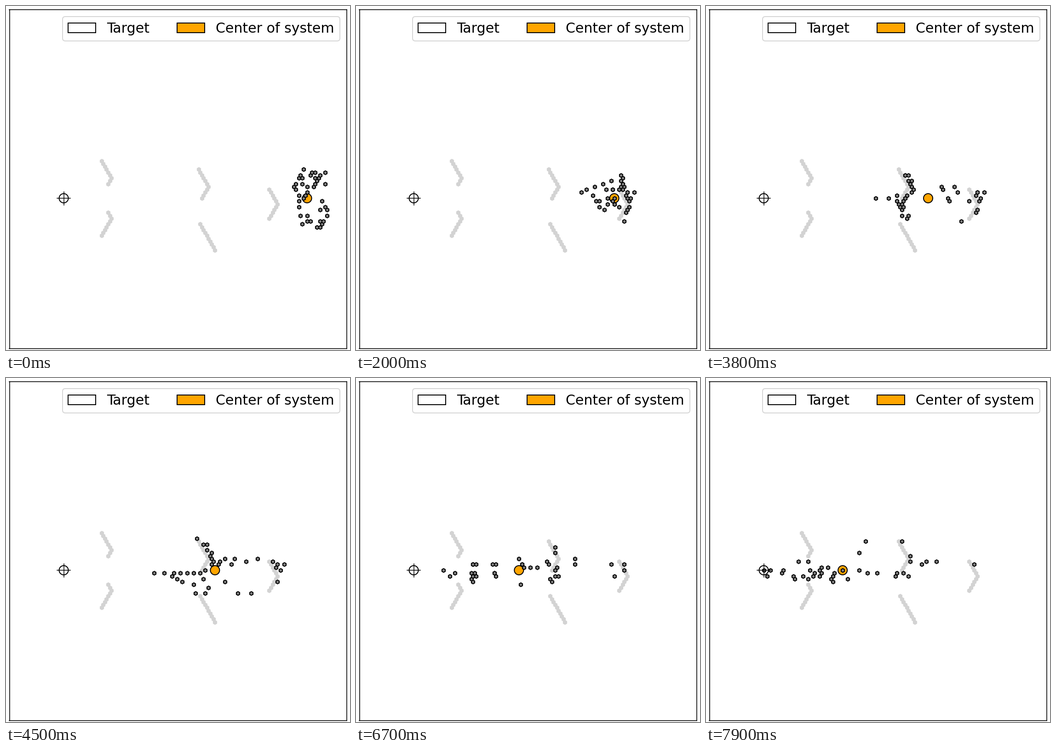
Recreate the animation shown at these times as a matplotlib script. Size 748 px wide and 748 px high, loop 8000 ms.

```python
import matplotlib.pyplot as plt
import numpy as np
from matplotlib.animation import FuncAnimation
from matplotlib.patches import Circle, Patch

SIZE, DPI = 748, 187
PX = 72 / DPI                      # points per pixel
FRAMES, STEP_MS = 80, 100
GOAL = np.array([125.5, 418.0])
HALF_COL, ROW = 3.575, 6.26        # hexagonal lattice pitch
HEX = 8.26 * PX
LINE = 2 * PX

# Key poses of the swarm: lattice row -> half-columns counted from the goal
START = {
    -10: [146], -9: [151, 153, 159], -8: [144, 150, 156],
    -7: [143, 145, 153, 155], -6: [154], -5: [141, 145, 153, 159],
    -4: [140, 148, 152], -3: [141], -2: [148], -1: [143, 147], 0: [146],
    1: [143, 157], 3: [143, 159], 4: [156, 160], 6: [144, 148, 160],
    8: [148, 150, 156, 158], 9: [145, 157], 10: [154, 156],
}
MIDDLE = {
    -11: [81], -9: [85, 87], -7: [87], -6: [90], -5: [89],
    -4: [90, 98, 104, 118], -3: [91, 95, 111, 127],
    -2: [90, 94, 102, 130, 134], -1: [129], 0: [86, 132],
    1: [55, 61, 67, 71, 75, 79, 83], 2: [66], 3: [69, 85],
    4: [72, 98, 130], 5: [79], 6: [88], 8: [80, 86, 106, 114],
}
END = {
    -10: [62, 84], -6: [58], -5: [89], -3: [21, 27, 89, 99, 105],
    -2: [96, 128], -1: [35, 39], 0: [0, 4, 12, 28, 34, 48, 58],
    1: [11, 31, 35, 43, 63, 69, 81, 85],
    2: [2, 18, 24, 30, 34, 42, 80, 88], 3: [19, 27, 41, 51], 4: [42],
}
KEYS = [(0, START), (45, MIDDLE), (79, END)]

# Places where the swarm queues: column, row of the tip, depth of the bend
STOPS = [(132, 2, 5), (90, -4, 6), (36, 0, 0), (2, 0, 0)]

# Obstacles as corners on the lattice
WALLS = [
    [(23, -13), (29, -7), (27, -5)],
    [(27, 5), (29, 7), (23, 13)],
    [(82, -10), (88, -4), (84, 0)],
    [(83, 9), (92, 18)],
    [(125, -3), (130, 2), (125, 7)],
]


def to_px(u, r):
    return GOAL[0] + HALF_COL * np.asarray(u), GOAL[1] + ROW * np.asarray(r)


def snap(u, r):
    """Nearest lattice site; column and row share their parity."""
    r = np.round(r)
    return r + 2 * np.round((u - r) / 2), r


def points(pose):
    return sorted((u, r) for r, cols in pose.items() for u in cols)


def leg(t0, a, t1, b):
    """Full speed from a to b, with the spare time spent in the queues."""
    (u0, r0), (u1, r1) = a, b
    span = max(u0 - u1, 1)
    halts = []
    for col, tip, depth in STOPS:
        if u1 - 4 <= col - 2 <= u0 + 4:
            r = r0 + (r1 - r0) * np.clip((u0 - col) / span, 0, 1)
            face = col - min(abs(r - tip), depth)
            halts.append((np.clip(face, u1, u0), r))
    spare = t1 - t0 - (u0 - u1) / 2
    way = [(t0, u0, r0)]
    for i, (u, r) in enumerate(halts):
        arrive = t0 + (u0 - u) / 2 + spare * i / len(halts)
        way += [(arrive, u, r), (arrive + spare / len(halts), u, r)]
    return way + [(t1, u1, r1)]


def swarm_paths():
    time = np.arange(FRAMES)
    us, rs = [], []
    for stations in zip(*(points(pose) for _, pose in KEYS)):
        way = []
        for i in range(len(KEYS) - 1):
            way += leg(KEYS[i][0], stations[i], KEYS[i + 1][0], stations[i + 1])
        t, u, r = np.array(way, float).T
        us.append(np.interp(time, t, u))
        rs.append(np.interp(time, t, r))
    return to_px(*snap(np.array(us), np.array(rs)))


def wall_sites(corners):
    sites = [corners[0]]
    for (u0, r0), (u1, r1) in zip(corners, corners[1:]):
        n = abs(r1 - r0)
        sites += [(u0 + (u1 - u0) * k / n, r0 + (r1 - r0) * k / n)
                  for k in range(1, n + 1)]
    return np.array(sites).T


fig = plt.figure(figsize=(SIZE / DPI, SIZE / DPI), dpi=DPI, facecolor="white")
left, right, top, bottom = 7.5, 740.5, 7.5, 744.5
ax = fig.add_axes([left / SIZE, 1 - bottom / SIZE,
                   (right - left) / SIZE, (bottom - top) / SIZE])
ax.set(xlim=(left, right), ylim=(bottom, top), xticks=[], yticks=[])
for spine in ax.spines.values():
    spine.set_linewidth(1.6 * PX)

for corners in WALLS:
    ax.plot(*to_px(*wall_sites(corners)), "h", ms=HEX, mew=LINE,
            color="lightgray", zorder=1)

center = ax.add_patch(Circle(GOAL, 10, fc="orange", ec="black",
                             lw=LINE, zorder=2))
swarm, = ax.plot([], [], "h", ms=HEX, mew=LINE, mfc="gray", mec="black",
                 zorder=3)

ax.add_patch(Circle(GOAL, 10, fill=False, ec="black", lw=LINE, zorder=4))
gx, gy = GOAL
ax.plot([gx - 14.5, gx + 14.5], [gy, gy], color="black", lw=1.5 * PX, zorder=4)
ax.plot([gx, gx], [gy - 14.5, gy + 14.5], color="black", lw=1.5 * PX, zorder=4)

handles = [Patch(fc="white", ec="black", lw=LINE, label="Target"),
           Patch(fc="orange", ec="black", lw=LINE, label="Center of system")]
legend = ax.legend(handles=handles, loc="upper right", ncol=2,
                   prop={"family": "DejaVu Sans", "size": 30 * PX})
legend.get_frame().set_linewidth(LINE)

swarm_x, swarm_y = swarm_paths()
center_u = np.interp(np.arange(FRAMES), [0, 9, 30, 45, 57, 67, 79],
                     [148, 134, 110, 92, 76, 64, 48])
center_x, center_y = to_px(*snap(center_u, np.zeros(FRAMES)))


def update(i):
    swarm.set_data(swarm_x[:, i], swarm_y[:, i])
    center.center = center_x[i], center_y[i]
    return swarm, center


anim = FuncAnimation(fig, update, frames=FRAMES, interval=STEP_MS,
                     repeat=True, repeat_delay=0)
plt.show()
```
